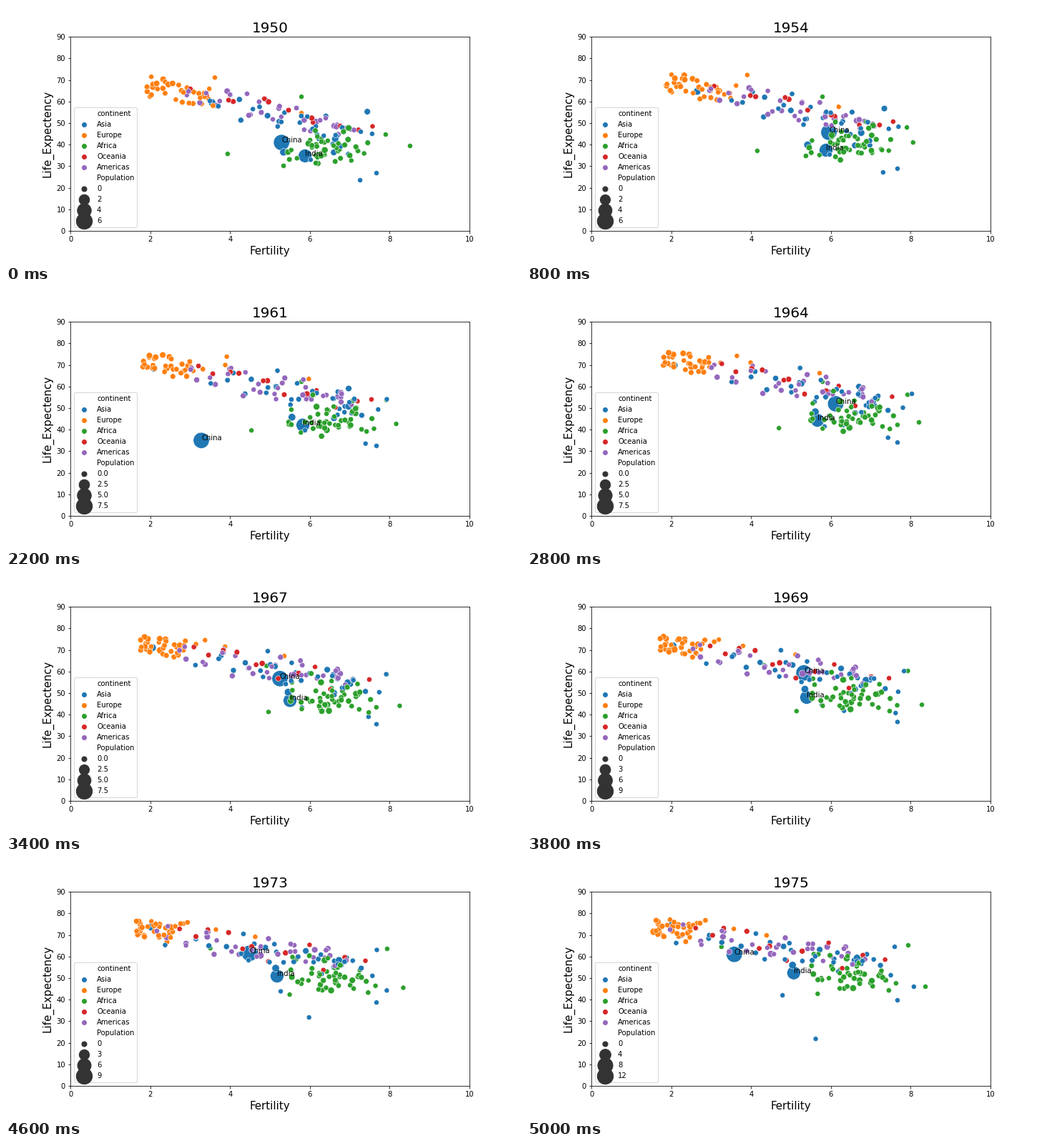
A matplotlib script for the animation above (5.2 s loop, 720x360 px).

```python
import numpy as np
import matplotlib.pyplot as plt
from matplotlib.animation import FuncAnimation
from matplotlib.lines import Line2D

YEARS = np.arange(1950, 1976)
T = np.linspace(0, 1, len(YEARS))
HUES = {"Asia": "C0", "Europe": "C1", "Africa": "C2", "Oceania": "C3", "Americas": "C4"}

rng = np.random.default_rng(12)
fig, ax = plt.subplots(figsize=(10, 5), dpi=72)
fig.subplots_adjust(left=.125, right=.9, bottom=.125, top=.88)

tracks = []  # (colour, share of the largest population, x per year, y per year)


def path(area, share, *keys):
    """One country moving through (year, fertility, life expectancy) keys."""
    year, x, y = np.transpose(keys)
    tracks.append((HUES[area], share, np.interp(YEARS, year, x), np.interp(YEARS, year, y)))


def wander(spread):
    """Offset that turns slowly from one seeded value to another."""
    a, b = np.clip(rng.normal(size=2), -1.7, 1.7) * spread
    return a * np.cos(T * np.pi / 2) + b * np.sin(T * np.pi / 2)


def group(area, ranks, spread, *spines):
    """Countries ranked along a line that moves from 1950 via 1964 to 1975.

    Each spine gives the fertility and life expectancy of both its ends.
    """
    x0, y0, x1, y1 = (np.interp(YEARS, (1950, 1964, 1975), k) for k in zip(*spines))
    for u in ranks:
        x = x0 + (x1 - x0) * u + wander(spread[0])
        y = y0 + (y1 - y0) * u + wander(spread[1])
        tracks.append((HUES[area], min(rng.exponential(.02), .1), x, y))


def spaced(n, power=1):
    return ((np.arange(n) + rng.uniform(.2, .8, n)) / n) ** power


# Countries that stand out by size or place
path("Asia", 1, (1950, 5.29, 41), (1954, 5.95, 45.7), (1958, 5.5, 49), (1961, 3.28, 35),
     (1964, 6.12, 52), (1967, 5.25, 56.7), (1971, 5.4, 62), (1975, 3.58, 61))
path("Asia", .68, (1950, 5.88, 34.8), (1960, 5.88, 41.4), (1975, 5.07, 52.4))
path("Asia", .13, (1950, 5.34, 36.5), (1964, 5.61, 48.3), (1975, 5.04, 56))
path("Asia", .13, (1950, 3.55, 59.5), (1954, 2.65, 64.7), (1958, 2.11, 67.2), (1975, 2.01, 74.5))
path("Asia", .07, (1950, 6.6, 36.4), (1975, 6.61, 56.6))
path("Asia", .06, (1950, 7.44, 55.3), (1958, 7.24, 58.2), (1975, 5.72, 63.2))
path("Americas", .1, (1950, 6.15, 50.5), (1964, 5.95, 57.2), (1975, 4.5, 61.2))
path("Americas", .06, (1950, 6.61, 48.7), (1967, 6.76, 59), (1975, 5.91, 64.5))
path("Africa", .06, (1950, 6.35, 36.4), (1964, 6.34, 43), (1975, 6.72, 49))
path("Europe", .11, (1950, 2.07, 66.9), (1964, 2.51, 69.2), (1975, 1.56, 71.5))
path("Europe", .002, (1950, 5.79, 54.6), (1956, 6.4, 59), (1964, 5.72, 66.2), (1975, 4.39, 69.8))
path("Europe", 0, (1950, 3.62, 71.1), (1958, 4.19, 73.5), (1975, 2.65, 75.5))
path("Europe", 0, (1950, 3.48, 65.9), (1964, 3.99, 71.1), (1975, 3.57, 72.8))
path("Africa", 0, (1950, 3.94, 35.7), (1964, 4.7, 40.7), (1975, 5.67, 42.7))
path("Africa", 0, (1950, 8.51, 39.4), (1954, 8.06, 41), (1975, 8.37, 46))
path("Africa", 0, (1950, 7.9, 44.7), (1975, 7.94, 65.2))
path("Africa", 0, (1964, 5.79, 62.2), (1971, 3.75, 63.2), (1975, 3.26, 64.5))
path("Asia", 0, (1950, 7.67, 26.8), (1975, 7.67, 39.7))
path("Asia", 0, (1950, 7.26, 23.5), (1967, 7.47, 39), (1975, 8.08, 46))
path("Asia", 0, (1950, 6.22, 42.7), (1971, 6.34, 41.7), (1975, 5.62, 21.8))
path("Asia", 0, (1950, 6.02, 33), (1971, 5.75, 45.7), (1975, 4.79, 42))
path("Asia", 0, (1950, 7.56, 45), (1964, 8.03, 56.6), (1975, 7.6, 64.5))
first = len(tracks)

group("Asia", spaced(30, .6), (.25, 4),
      (3, 64, 7.2, 42), (3.2, 69, 7.6, 50), (1.9, 73, 7.4, 54))
group("Europe", spaced(32, 1.3), (.13, 3),
      (1.95, 66.5, 3.6, 63), (1.85, 71, 3.1, 70.5), (1.6, 72, 2.7, 72))
group("Africa", rng.beta(2, 2, 46), (.2, 4.5),
      (5.2, 37, 7.7, 42), (5.2, 46, 7.9, 49), (5.2, 54, 7.8, 51))
group("Oceania", spaced(12), (.2, 3),
      (2.9, 69, 7.7, 45), (3, 70.5, 7.6, 52), (2.2, 71, 7.4, 57))
group("Americas", spaced(31, .8), (.15, 2.8),
      (2.6, 66, 7.2, 46), (2.7, 69, 7.2, 54), (1.8, 72, 6.8, 58))

# Large countries lie beneath, the rest overlap in mixed order
order = [*range(first), *(first + rng.permutation(len(tracks) - first))]
colors, shares, xs, ys = zip(*(tracks[i] for i in order))
sizes = 50 + 450 * np.array(shares)
xs, ys = np.array(xs), np.array(ys)
largest = np.interp(YEARS, (1950, 1967, 1975), (5.5, 7.49, 9.1))


def legend(pop):
    step = next(s for s in (2, 2.5, 3, 4) if 3 * s >= pop)

    def heading(text):
        return Line2D([], [], linestyle="none", label=text)

    def dot(label, **style):
        return ax.scatter([], [], label=label, **style)

    values = [k * step for k in range(4)]
    ax.legend(loc="lower left", handles=[
        heading("continent"),
        *(dot(name, color=c) for name, c in HUES.items()),
        heading("Population"),
        *(dot(f"{v:.1f}" if step == 2.5 else str(v), color=".2",
              s=50 + 450 * min(v / pop, 1)) for v in values)])


def draw(i):
    ax.clear()
    ax.scatter(xs[:, i], ys[:, i], s=sizes, c=colors, edgecolors="w", linewidths=.57)
    for k, name in enumerate(("China", "India")):
        ax.text(xs[k, i], ys[k, i], name)
    ax.set(xlim=(0, 10), ylim=(0, 90), xticks=range(0, 11, 2), yticks=range(0, 91, 10))
    ax.set_title(str(YEARS[i]), fontsize=20)
    ax.set_xlabel("Fertility", fontsize=15)
    ax.set_ylabel("Life_Expectency", fontsize=15)
    legend(largest[i])
    return []


anim = FuncAnimation(fig, draw, frames=len(YEARS), interval=200,
                     init_func=lambda: draw(0), repeat=True, repeat_delay=0)
plt.show()
```
